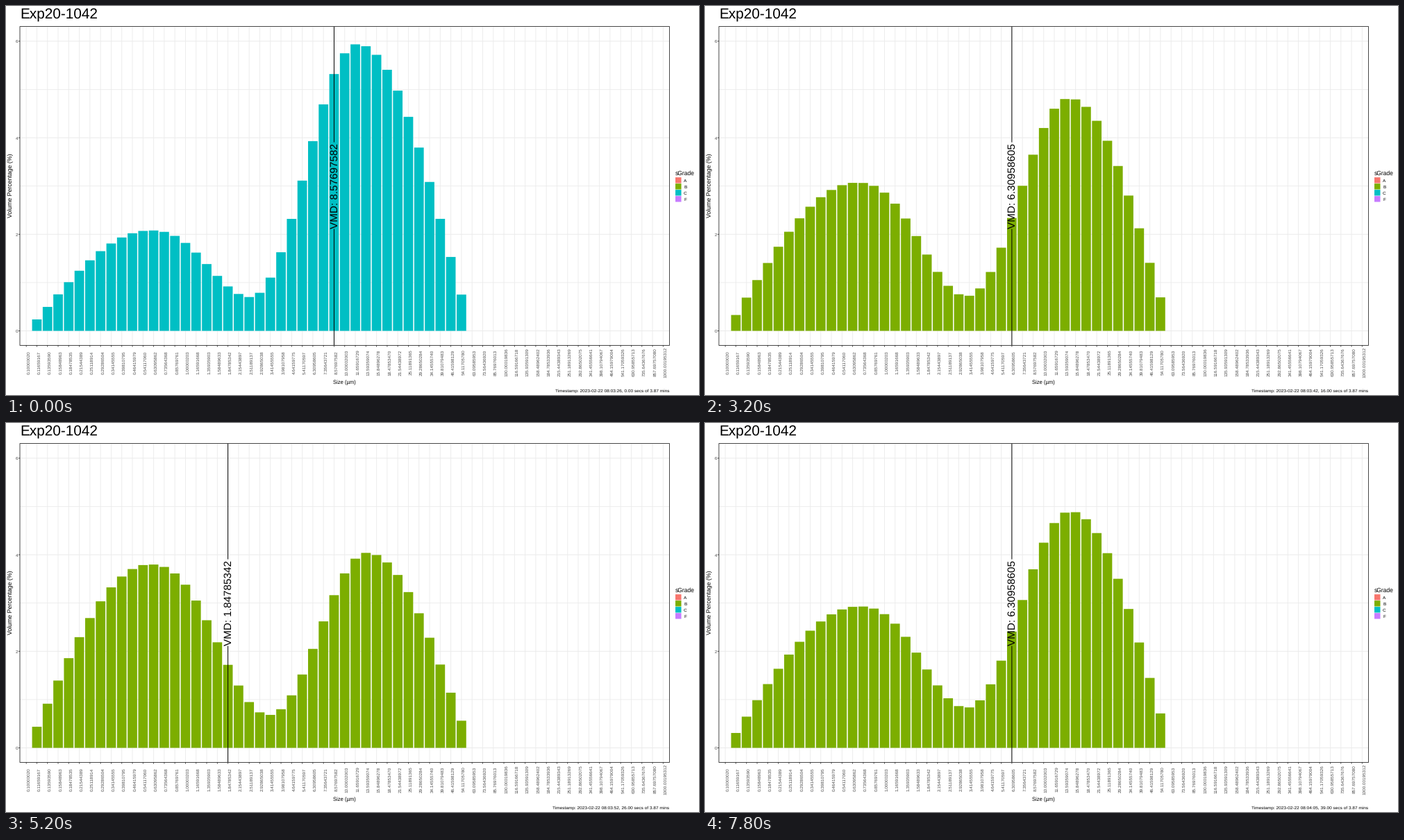
A matplotlib script for the animation above (8 s loop, 998 by 561 pixels).

```python
import numpy as np
import matplotlib.pyplot as plt
from matplotlib.animation import FuncAnimation
from matplotlib.patches import Rectangle

W, H, DPI = 998, 561, 64
FRAMES, STEP_MS = 40, 200
PX = 72 / DPI  # points per pixel

LEFT, RIGHT, TOP, BOTTOM = 20, 955.5, 29.5, 489.5
PITCH = (RIGHT - LEFT) / 61.2
Y0, UNIT = 468.5, 69.62
CENTER_X, CENTER_Y = (LEFT + RIGHT) / 2, (TOP + BOTTOM) / 2

GRADES = {"A": "#F8766D", "B": "#7CAE00", "C": "#00BFC4", "F": "#C77CFF"}
GRID, DARK, GREY = "#EBEBEB", "#333333", "#4D4D4D"

# Size classes: 15 per decade, stored in single precision
SIZES = [f"{np.float32(0.1 * 10 ** (i / 15) * 1.00000197):.8f}"
         for i in range(61)]
BINS = np.arange(1, 42)
TAIL_END = 42.1

# second, grade, then (bin, %) of the fine peak, the trough, the coarse peak
STATES = [
    (0, "C", (11.7, 2.08), (21.1, 0.70), (31.2, 5.94)),
    (11, "B", (12.4, 2.93), (22.5, 0.87), (32.4, 4.83)),
    (16, "B", (12.4, 3.07), (22.7, 0.72), (32.4, 4.82)),
    (22, "C", (12.2, 2.75), (22.2, 0.79), (32.2, 5.10)),
    (26, "B", (11.6, 3.80), (22.8, 0.68), (32.1, 4.04)),
    (33, "B", (12.3, 2.82), (22.2, 0.79), (32.0, 5.06)),
    (39, "B", (12.6, 2.93), (22.7, 0.83), (32.5, 4.90)),
]
TIMES = np.array([s[0] for s in STATES])
TURNS = np.array([np.ravel(s[2:]) for s in STATES])

plt.rcParams["font.family"] = "Liberation Sans"
plt.rcParams["text.hinting"] = "no_hinting"
plt.rcParams["path.snap"] = False


def unit(x, start, end):
    return np.clip((x - start) / (end - start), 0, 1)


def swing(x, x0, y0, x1, y1, power):
    """Cosine ease from one turning point to the next."""
    u = unit(x, x0, x1) ** power
    return y0 + (y1 - y0) * (1 - np.cos(np.pi * u)) / 2


def flank(x, foot, top, height, power):
    """Quarter sine from zero at the foot up to the peak."""
    return height * np.sin(np.pi / 2 * unit(x, foot, top)) ** power


def heights_at(sec):
    x1, y1, xt, yt, x2, y2 = [np.interp(sec, TIMES, p) for p in TURNS.T]
    return np.select(
        [BINS < x1, BINS < xt, BINS < x2],
        [flank(BINS, 0, x1, y1, 1.08),
         swing(BINS, x1, y1, xt, yt, 1.2),
         swing(BINS, xt, yt, x2, y2, 1.03)],
        flank(BINS, TAIL_END, x2, y2, 1.12))


def grade_at(sec):
    return STATES[int(np.argmin(np.abs(TIMES - sec)))][1]


def tick_x(i):
    return LEFT + (0.6 + i) * PITCH


fig = plt.figure(figsize=(W / DPI, H / DPI), dpi=DPI, facecolor="white")
ax = fig.add_axes([0, 0, 1, 1])
ax.axis("off")


def line(x, y, color, width, z=1):
    return ax.plot(x, y, color=color, lw=width * PX, zorder=z,
                   solid_capstyle="butt")[0]


def text(x, y, s, size, color="black", ha="left", rot=0):
    return ax.text(x, y, s, fontsize=size * PX, color=color, ha=ha,
                   va="baseline", rotation=rot, rotation_mode="anchor",
                   zorder=6)


# Grid, ticks and tick labels
for v in range(7):
    y = Y0 - v * UNIT
    major = v % 2 == 0
    line([LEFT, RIGHT], [y, y], GRID, 1 if major else 0.8)
    if major:
        line([LEFT - 2, LEFT], [y, y], DARK, 0.9)
        text(17.4, y + 2.6, str(v), 6.4, GREY, "right")
for i, label in enumerate(SIZES):
    x = tick_x(i)
    line([x, x], [TOP, BOTTOM], GRID, 0.9)
    line([x, x], [BOTTOM, BOTTOM + 2], DARK, 0.9)
    text(x + 5.2, 514, label, 6.4, GREY, "center", 90)

ax.add_patch(Rectangle((LEFT, TOP), RIGHT - LEFT, BOTTOM - TOP, fill=False,
                       ec=DARK, lw=0.9 * PX, zorder=4))

# Titles and legend
text(20, 18.8, "Exp20-1042", 20.7)
text(CENTER_X, 545.4, "Size (µm)", 7.6, ha="center")
text(9.6, CENTER_Y - 0.5, "Volume Percentage (%)", 8.7, ha="center", rot=90)
text(964, 243.7, "sGrade", 8.5)
for row, (grade, color) in enumerate(GRADES.items()):
    y = 251.3 + 9 * row
    ax.add_patch(Rectangle((964, y - 4.2), 8.5, 8.4, fc=color, lw=0))
    text(976, y + 2.6, grade, 6.4)

# Moving parts
bars = ax.bar(tick_x(BINS), np.zeros(len(BINS)), 0.9 * PITCH, Y0,
              zorder=2, lw=0)
upper = line([0, 0], [TOP, 196.5], "black", 1, 3)
lower = line([0, 0], [321.5, BOTTOM], "black", 1, 3)
vmd_text = text(0, CENTER_Y, "", 15.3, ha="center", rot=90)
stamp = text(RIGHT, 556.3, "", 6.47, ha="right")
ax.set_xlim(0, W)
ax.set_ylim(H, 0)


def update(sec):
    heights = heights_at(sec)
    color = GRADES[grade_at(sec)]
    for bar, h in zip(bars, heights):
        bar.set_height(-h * UNIT)
        bar.set_facecolor(color)

    # Volume median: first bin that reaches half of the total
    total = np.cumsum(heights)
    median = BINS[np.searchsorted(total, total[-1] / 2)]
    x = tick_x(median)
    upper.set_xdata([x, x])
    lower.set_xdata([x, x])
    vmd_text.set_x(x + 5)
    vmd_text.set_text(f"VMD: {SIZES[median]}")

    minute, second = divmod(3 * 60 + 26 + sec, 60)
    stamp.set_text(f"Timestamp: 2023-02-22 08:{minute:02d}:{second:02d}, "
                   f"{sec:.2f} secs of 3.87 mins")
    return [*bars, upper, lower, vmd_text, stamp]


anim = FuncAnimation(fig, update, frames=FRAMES, interval=STEP_MS,
                     repeat=True, repeat_delay=0, blit=False)
plt.show()
```
